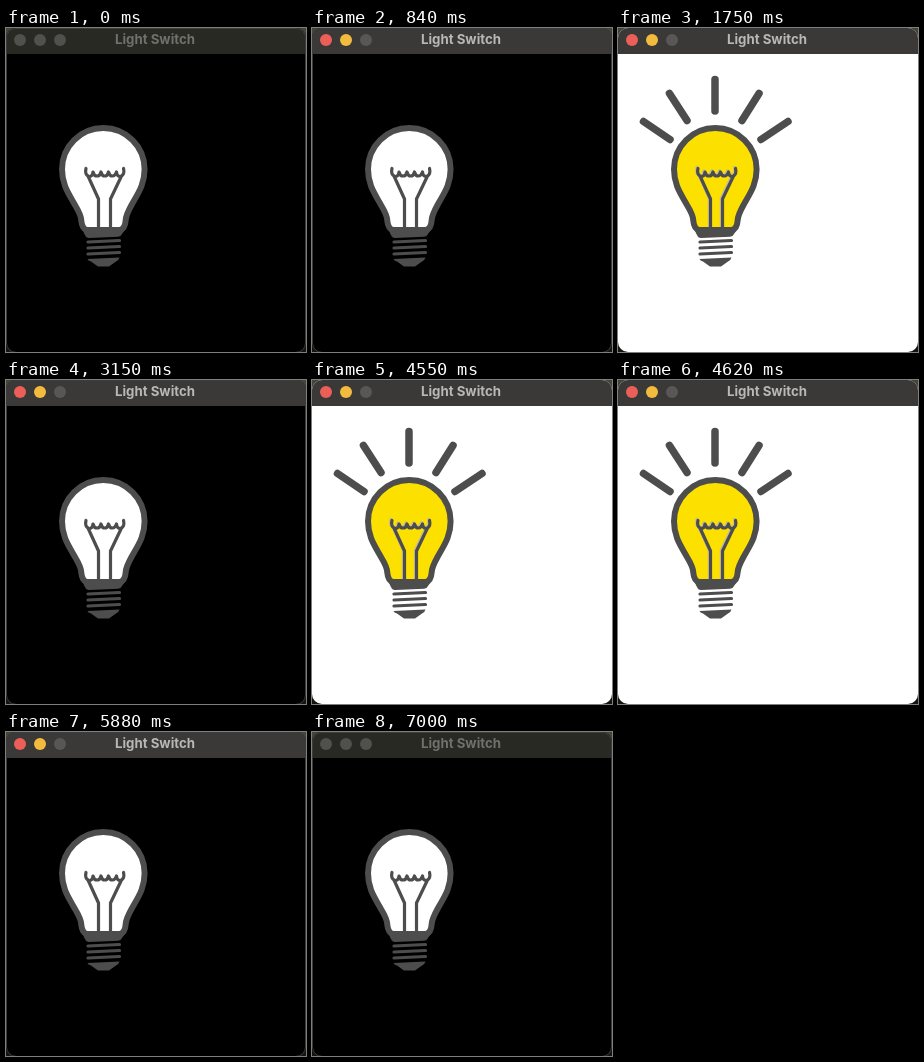
An HTML page that plays this animation: 300x324 px, repeating every 7070 ms.

```html
<!DOCTYPE html>
<html lang="en">
<head>
<meta charset="utf-8">
<title>Light Switch</title>
<style>
  html, body { margin: 0; width: 100%; height: 100%; overflow: hidden; background: #15150f; }
  svg { display: block; width: 300px; height: 324px; }
  text { font: 700 13.250px Inter, "Liberation Sans", sans-serif; text-anchor: middle; fill: #b9b8b6; }
  .room { fill: #000; }
  .bar { fill: #3a3937; }
  .edge { fill: none; stroke: #3c3c3a; }
  .line { fill: none; stroke: #4d4d4d; stroke-linecap: round; stroke-linejoin: round; }
  .metal { fill: #4d4d4d; }
  .glass { fill: #fff; stroke: #4d4d4d; stroke-width: 6; stroke-linejoin: round; }
  .rays, .shade { visibility: hidden; }
  .on .rays, .on .shade { visibility: visible; }
  .on .room { fill: #fff; }
  .on .glass { fill: #fbe000; }
  .on .edge { stroke: none; }
  .idle .bar { fill: #282923; }
  .idle text { fill: #70706c; }
  .idle circle { fill: #50504c; }
</style>
</head>
<body>
<svg id="app" viewBox="0 0 300 324">
  <defs>
    <path id="filament" d="M80 140.500Q78.500 146 82.500 148.500Q86.500 149 87 144Q88 148 91 148Q94 148 95 144Q96 148 98.700 148Q101.500 148 102.500 144Q103.500 148 106.500 148Q109 148 110.500 144Q111 149 115 148.500Q119 146 117.500 140.500M82 148L92.500 171V200M115.500 148L104.500 171V200"/>
    <clipPath id="frame"><rect width="300" height="324" rx="10"/></clipPath>
  </defs>
  <rect width="300" height="12" fill="#45453a"/>
  <g clip-path="url(#frame)">
    <rect class="room" width="300" height="324"/>
    <rect class="bar" width="300" height="26"/>
  </g>
  <rect class="edge" x=".5" y=".5" width="299" height="324" rx="9.500"/>
  <circle cx="14" cy="12" r="6" fill="#ec5f58"/>
  <circle cx="34" cy="12" r="6" fill="#f3bb3e"/>
  <circle cx="54" cy="12" r="6" fill="#585755"/>
  <text x="149" y="16.300">Light Switch</text>

  <path class="line rays" stroke-width="7.500" d="M97 51.500V83M51.500 65.500L69 92.500M141 65.500L124 92.500M25.500 93.500L52 111.500M170 93.500L143 111.500"/>
  <path class="glass" d="M97.300 100A41.300 41.300 0 0 1 138.600 141.300C138.600 157 131.500 166 125.500 177Q120 187 119.700 192Q119 201 114 202H81Q76 201 75.200 192Q75 187 69 177C63 166 56 157 56 141.300A41.300 41.300 0 0 1 97.300 100Z"/>
  <use class="line shade" href="#filament" x="-1" y="-1" style="stroke:#c9c08a" stroke-width="3.500"/>
  <use class="line" href="#filament" stroke-width="3.200"/>
  <path class="metal" d="M79 199H116Q119 203 116 206Q115 208.500 112 208.700L83 210Q80 210 79 207Q76 203 79 199Z"/>
  <path class="line" stroke-width="3.200" d="M82 214L113.500 212.500M82 220L113.500 218.500M82 226L113.500 224.500"/>
  <path class="metal" d="M81.500 231L113.500 229.500Q113 232 110 233.500L103 238.500H92L85 233.500Q82 232.500 81.500 231Z"/>
</svg>
<script>
  const app = document.getElementById("app");
  const within = (t, a, b) => t >= a && t < b;

  function draw() {
    const t = performance.now() % 7070;
    app.classList.toggle("idle", !within(t, 840, 7000));
    app.classList.toggle("on", within(t, 1680, 3150) || within(t, 4550, 5880));
    requestAnimationFrame(draw);
  }
  draw();
</script>
</body>
</html>
```
